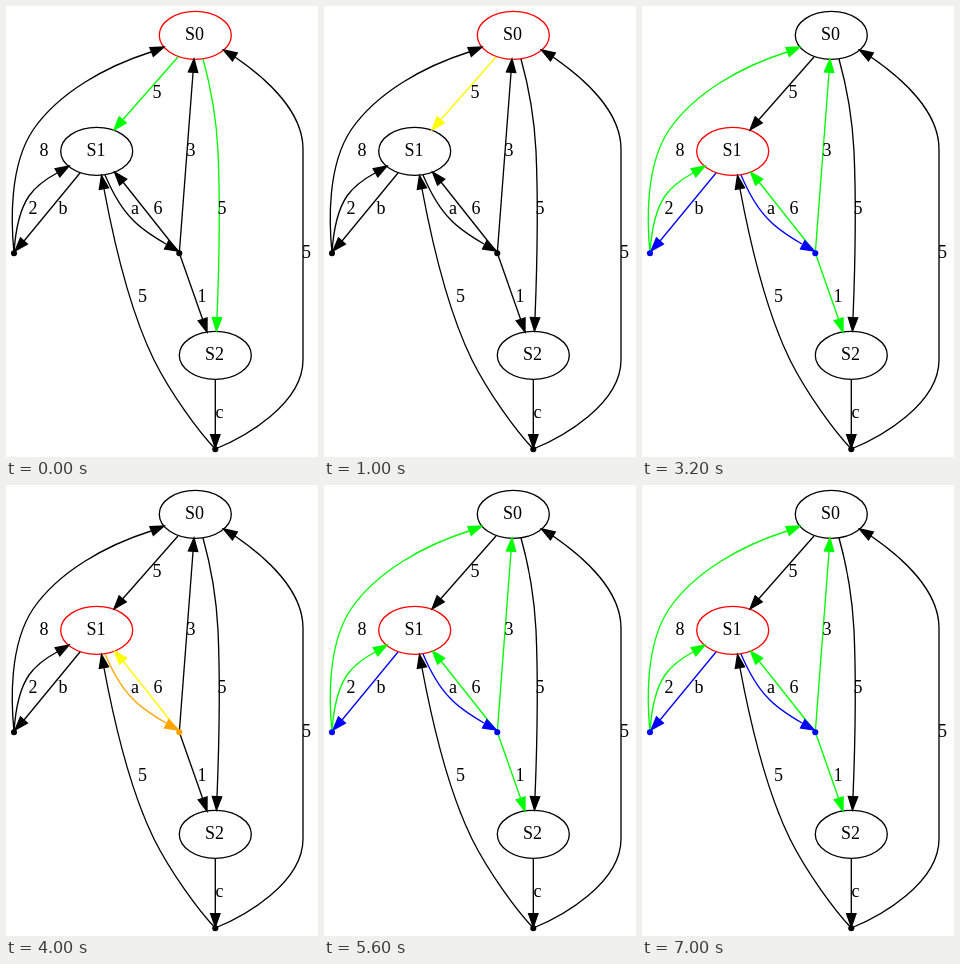
Recreate the animation shown at these times as an HTML page. Size 312 px wide and 451 px high, loop 8000 ms.

```html
<!DOCTYPE html>
<html lang="en">
<head>
<meta charset="utf-8">
<title>State graph</title>
<style>
html, body { margin: 0; width: 100%; height: 100%; overflow: hidden; background: #fff; }
svg { display: block; width: 312px; height: 451px; }
text { font: 18px "Liberation Serif", "Times New Roman", serif; text-anchor: middle; }
</style>
</head>
<body>
<svg id="graph" viewBox="0 0 312 451" stroke-width="1.33"></svg>
<script>
const NS = "http://www.w3.org/2000/svg";
const svg = document.getElementById("graph");
const GREEN = "#00ff00", BLUE = "#0000ff", YELLOW = "#ffff00", ORANGE = "#ffa500", RED = "#ff0000";

// id: [path, arrow base, arrow tip, label, label x, baseline]
const edges = {
  s0s1: ["M172 51L117 113.5", [117, 113.5], [108, 124], "5", 151, 92],
  s0s2: ["M197 53C204 78 210 106 212 145C214.5 201 213 262 211 312", [211, 312], [210.5, 325], "5", 216, 208],
  as1: ["M173.3 247L117 176", [117, 176], [108.5, 166], "6", 152, 208],
  as0: ["M173.3 247L187 67", [187, 67], [188, 53], "3", 185, 150],
  as2: ["M173.3 247L196.5 313", [196.5, 313], [201, 326], "1", 196, 296],
  s1a: ["M99 169C105 183 114 201 126 213C135 223 148 231 160 238", [160, 238.5], [172.5, 245], "a", 129, 208],
  s1b: ["M74 167L18 235", [18, 235], [9, 245], "b", 57, 208],
  bs0: ["M8 247C5 217 3 160 27 124C53 86 101 60 145 46", [145.5, 46], [158, 41], "8", 38, 150],
  bs1: ["M8 247C9 231 12 206 23 190C30 180 40 173 51 167", [51, 167], [63, 160], "2", 27, 208],
  s2c: ["M209.3 373L209.3 429", [209.3, 429], [209.3, 442], "c", 213.5, 412],
  cs1: ["M209.3 443C193 426 165 388 148 354C122 301 107 231 98 183", [98, 183], [95.5, 169.5], "5", 136.5, 296],
  cs0: ["M209.3 443C239 431 297 398 297 354L297 143C297 106 261 73 229 51", [229, 51], [217.5, 44], "5", 300.5, 252]
};
const states = { s0: [189.3, 29.3, "S0"], s1: [90.7, 145.3, "S1"], s2: [209.3, 349.3, "S2"] };
const dots = { a: [173.3, 247.2], b: [8, 247.2], c: [209.3, 443.2] };

const atS0 = { s0: RED, s0s1: GREEN, s0s2: GREEN };
const moveToS1 = { s0: RED, s0s1: YELLOW };
const atS1 = {
  s1: RED, s1a: BLUE, s1b: BLUE, a: BLUE, b: BLUE,
  as0: GREEN, as1: GREEN, as2: GREEN, bs0: GREEN, bs1: GREEN
};
const stayInS1 = { s1: RED, s1a: ORANGE, a: ORANGE, as1: YELLOW };
const steps = [atS0, moveToS1, atS1, atS1, stayInS1, atS1, stayInS1, atS1];

const parts = {};

function add(parent, tag, attrs, text) {
  const el = document.createElementNS(NS, tag);
  for (const key in attrs) el.setAttribute(key, attrs[key]);
  if (text) el.textContent = text;
  return parent.appendChild(el);
}

function arrowPoints([bx, by], [tx, ty]) {
  const angle = Math.atan2(ty - by, tx - bx);
  const ux = Math.cos(angle), uy = Math.sin(angle);
  const x = tx - 13.33 * ux, y = ty - 13.33 * uy, half = 4.67;
  return `${tx},${ty} ${x - half * uy},${y + half * ux} ${x + half * uy},${y - half * ux}`;
}

for (const id in states) {
  const [cx, cy, name] = states[id];
  parts[id] = add(svg, "g", { fill: "none" });
  add(parts[id], "ellipse", { cx, cy, rx: 36, ry: 24 });
  add(svg, "text", { x: cx - 0.8, y: Math.floor(cy) + 5 }, name);
}
for (const id in edges) {
  const [d, base, tip, label, x, y] = edges[id];
  parts[id] = add(svg, "g", {});
  add(parts[id], "path", { d, fill: "none" });
  add(parts[id], "polygon", { points: arrowPoints(base, tip) });
  add(svg, "text", { x, y }, label);
}
for (const id in dots) {
  const [cx, cy] = dots[id];
  parts[id] = add(svg, "g", {});
  add(parts[id], "circle", { cx, cy, r: 2.4 });
}

let shown = -1;
function render(ms) {
  const step = Math.floor(ms / 1000) % steps.length;
  if (step === shown) return;
  shown = step;
  for (const id in parts) {
    const color = steps[step][id] || "#000";
    parts[id].setAttribute("stroke", color);
    if (!(id in states)) parts[id].setAttribute("fill", color);
  }
}

const start = performance.now();
function tick() {
  render(performance.now() - start);
  requestAnimationFrame(tick);
}
tick();
</script>
</body>
</html>
```
